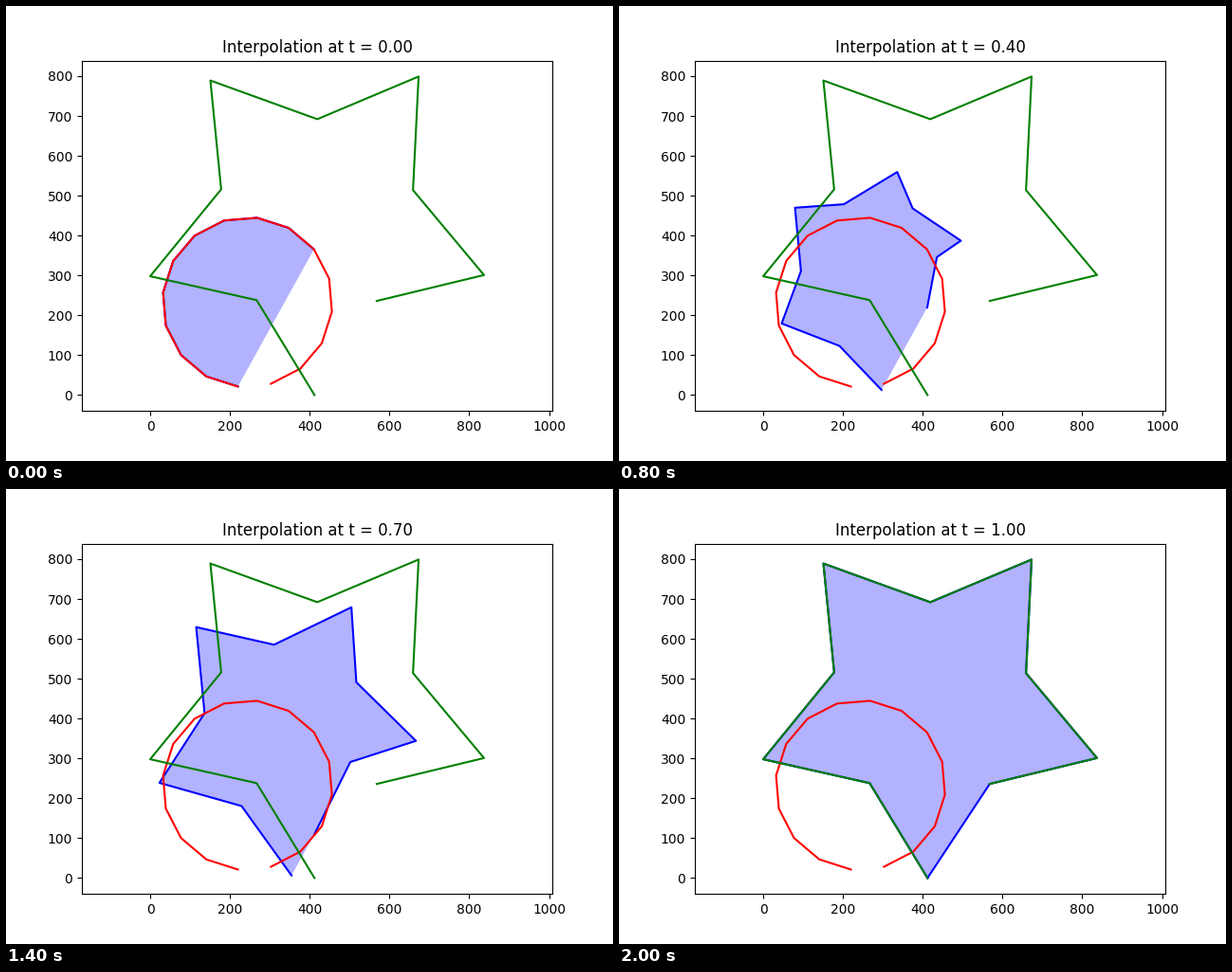
Recreate the animation shown at these times as a matplotlib script. Size 640x480 px, loop 2.2 s.

```python
import numpy as np
import matplotlib.pyplot as plt
from matplotlib.animation import FuncAnimation

STEPS = 11
INTERVAL = 200


def arc(center, radius, first, sides, count):
    """Corners of a regular polygon, taken clockwise from the angle `first`."""
    angle = np.radians(first - 360 / sides * np.arange(count))
    return center + radius * np.column_stack([np.cos(angle), np.sin(angle)])


ring = arc((244, 233), 213, 263.5, 16, 16)
star = np.array([
    (412, 0), (267, 238), (0, 298), (178, 516), (151, 789),
    (419, 692), (673, 799), (659, 514), (837, 301), (568, 236),
])

# The moving outline runs round the whole star and back to its first corner.
end = np.vstack([star, star[:1]])
start = ring[:len(end)]

fig, ax = plt.subplots(figsize=(6.4, 4.8), dpi=100)
shape, = ax.fill(*start.T, "b", alpha=0.3, linewidth=0)
outline, = ax.plot(*start.T, color="blue")
ax.plot(*ring.T, color="red")
ax.plot(*star.T, color="green")
ax.axis("equal")
title = ax.set_title("")


def update(i):
    t = i / (STEPS - 1)
    points = (1 - t) * start + t * end
    shape.set_xy(points)
    outline.set_data(*points.T)
    title.set_text(f"Interpolation at t = {t:.2f}")
    return shape, outline, title


anim = FuncAnimation(fig, update, frames=STEPS, interval=INTERVAL,
                     repeat=True, repeat_delay=0)
plt.show()
```
